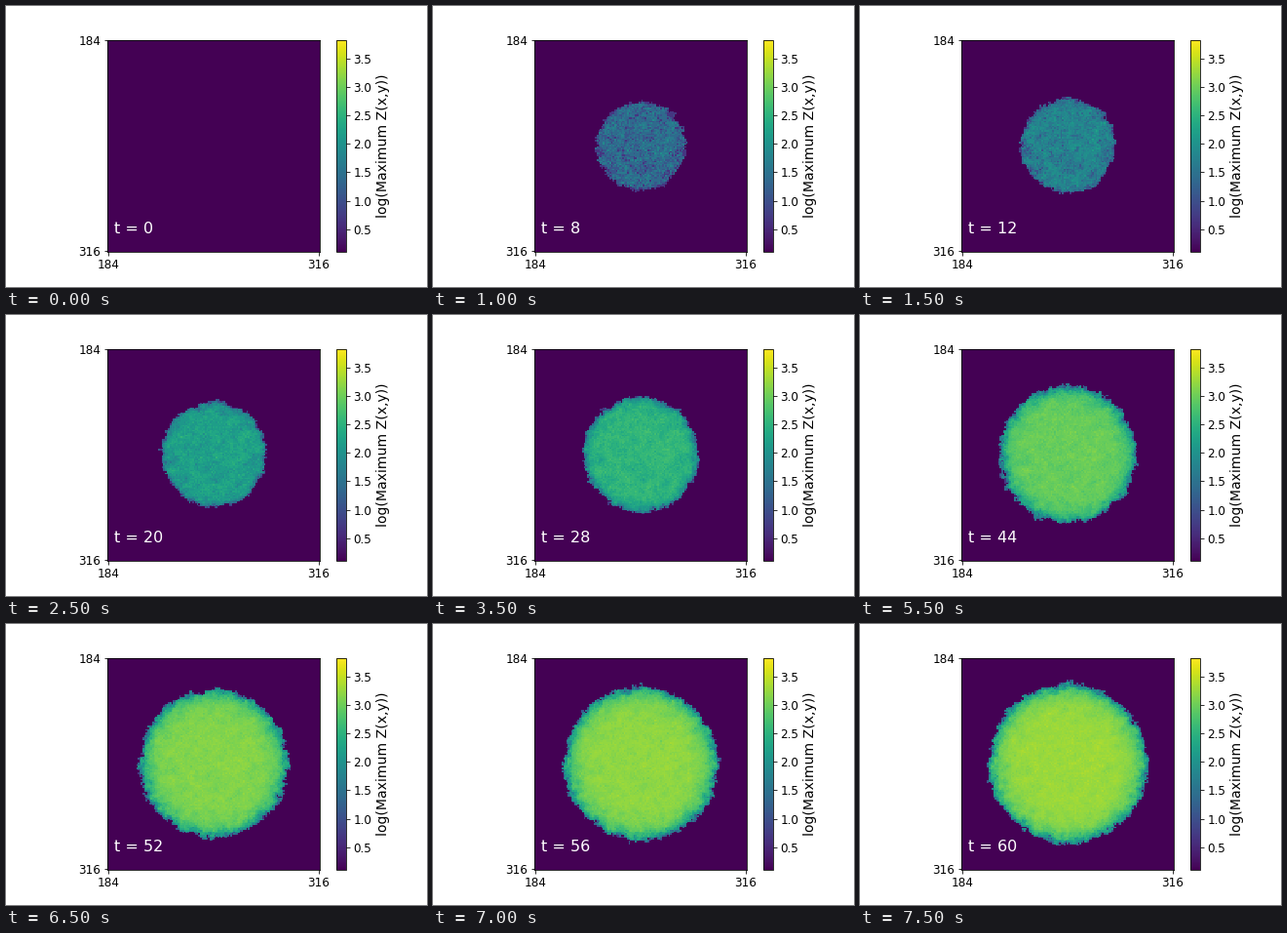
A matplotlib script that plays this animation: 432x288 px, repeating every 8 s.

```python
import numpy as np
import matplotlib.pyplot as plt
from matplotlib.animation import FuncAnimation

N = 133                 # cells per side, coordinates 184..316
FIRST, LAST = 184, 316
FRAMES, STEP = 16, 4    # time units advanced per frame
SPEED = 0.42            # radial growth in cells per time unit
R0 = 24.6               # starting radius in cells


def blur(field, sigma):
    """Periodic Gaussian blur, rescaled to unit deviation."""
    f = np.fft.fftfreq(N)
    g = np.exp(-2 * (np.pi * sigma) ** 2 * (f[:, None] ** 2 + f ** 2))
    out = np.fft.ifft2(np.fft.fft2(field) * g).real
    return out / out.std()


def white(seed):
    return np.random.default_rng(seed).standard_normal((N, N))


y, x = np.mgrid[:N, :N]
rho = np.hypot(x - 66.3, y - 66)

# Radius at which the front reaches each cell, roughened with distance
rough = 0.5 * white(1) + 0.7 * blur(white(2), 1.2) + 0.3 * blur(white(3), 4)
reach = rho + rough * np.clip(0.7 + (rho - R0) / 40, 0.5, 1.1)

# No cell is filled before one of its neighbours
for _ in range(3):
    near = np.min([np.roll(reach, s, a) for s in (-1, 1) for a in (0, 1)], axis=0)
    reach = np.maximum(reach, near)

bumps = blur(white(4), 1.5)


def log_height(k):
    t = k * STEP
    if t == 0:
        return np.zeros((N, N))
    depth = R0 + SPEED * t - reach
    top = 0.6 + 0.43 * t
    rim = 0.3 + 0.09 * t
    share = 1 - np.exp(-np.maximum(depth + 0.5, 0) / rim)
    noise = 0.85 * white(100 + k) + min(0.7, 0.05 * t) * bumps
    z = np.round(top * share + noise * np.sqrt(share))
    return np.where(depth > 0, np.log(np.maximum(z, 2)), 0)


plt.rcParams.update({"font.family": "DejaVu Sans", "font.size": 12,
                     "figure.subplot.bottom": 0.125})
fig, ax = plt.subplots(figsize=(6, 4), dpi=72)

img = ax.imshow(log_height(0), cmap="viridis", vmin=0.1, vmax=3.83,
                interpolation="nearest",
                extent=(FIRST - 0.5, LAST + 0.5, LAST + 0.5, FIRST - 0.5))
ax.set_xticks([FIRST, LAST])
ax.set_yticks([FIRST, LAST])
bar = fig.colorbar(img, ax=ax)
bar.set_ticks(np.arange(0.5, 3.6, 0.5))
bar.set_label("log(Maximum Z(x,y))", fontsize=14, labelpad=5)
clock = ax.text(0.03, 0.0875, "t = 0", color="white", fontsize=16,
                transform=ax.transAxes)


def update(k):
    img.set_data(log_height(k))
    clock.set_text(f"t = {k * STEP}")
    return img, clock


anim = FuncAnimation(fig, update, frames=FRAMES, interval=500,
                     repeat=True, repeat_delay=0)
plt.show()
```
